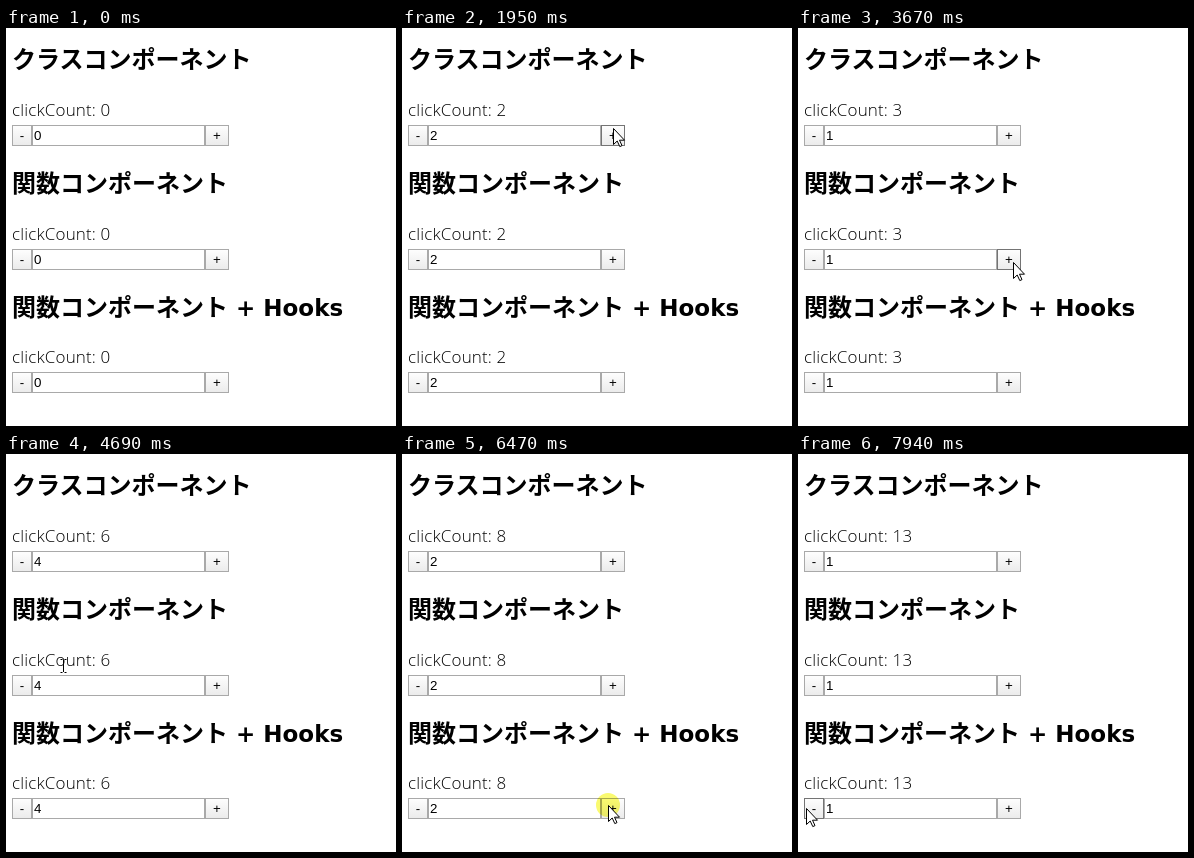
Recreate the animation shown at these times as an HTML page. Size 390x398 px, loop 8000 ms.

```html
<!DOCTYPE html>
<html lang="ja">
<meta charset="utf-8">
<title>clickCount</title>
<style>
html, body { margin: 0; width: 100%; height: 100%; overflow: hidden; background: #fff; }
svg { display: block; width: 390px; height: 398px; }
.head { font: bold 24px "Noto Sans CJK JP", "Noto Sans CJK", sans-serif; }
.latin { font: bold 23px "DejaVu Sans", sans-serif; white-space: pre; }
.count { font: 300 17px "Open Sans", sans-serif; letter-spacing: .15px; }
.ui { font: 13.33px "Liberation Sans", Arial, sans-serif; }
.mid { text-anchor: middle; }
.box { fill: #fff; stroke: #a9a9a9; }
.btn { fill: url(#face); stroke: #a9a9a9; }
.btn.hover { stroke: #747474; }
#halo { fill: #fafa70; mix-blend-mode: multiply; }
</style>
<svg viewBox="0 0 390 398">
  <linearGradient id="face" x2="0" y2="1"><stop stop-color="#fefefe"/><stop offset="1" stop-color="#ebebeb"/></linearGradient>
  <g id="rows"></g>
  <circle id="halo" r="12"/>
  <path id="arrow" d="M.5.5V16.5L4.2 13 6.8 18.6 9 17.6 6.5 12.2H11.5Z" fill="#fff" stroke="#000"/>
  <path id="beam" d="M-2.5-6.5H-.5M1.5-6.5H3.5M.5-6V6M-2.5 6.5H-.5M1.5 6.5H3.5" fill="none" stroke="#000"/>
</svg>
<script>
const LOOP = 8000, STEP = 78;
const $ = id => document.getElementById(id);
const rowY = [0, 124, 247];
const titles = ['クラスコンポーネント', '関数コンポーネント', '関数コンポーネント<tspan class="latin"> + Hooks</tspan>'];

const smooth = s => s * s * s * (10 - 15 * s + 6 * s * s);
const out = p => s => 1 - (1 - s) ** p;

// The pointer travels to each button between start and end on a bowed path,
// then clicks it `times` times, `gap` apart, holding it down for `hold`.
const visits = [
  { start: 380, end: 770, x: 212, y: 113, bow: 0, ease: smooth, add: 1, press: 1320, gap: 400, times: 2, hold: 80 },
  { start: 1950, end: 2720, x: 13, y: 112, bow: -46, ease: smooth, add: -1, press: 2810, gap: 0, times: 1, hold: 170 },
  { start: 3060, end: 3670, x: 215, y: 234, bow: 10, ease: smooth, add: 1, press: 3740, gap: 315, times: 3, hold: 80 },
  { start: 4600, end: 5150, x: 16, y: 232, bow: -29, ease: out(5.5), add: -1, press: 5300, gap: 310, times: 2, hold: 155 },
  { start: 5930, end: 6390, x: 206, y: 351, bow: 0, ease: smooth, add: 1, press: 6470, gap: 310, times: 2, hold: 150 },
  { start: 6930, end: 7470, x: 8, y: 354, bow: 16, ease: out(2.8), add: -1, press: 7560, gap: 150, times: 3, hold: 80 }
];

const clicks = visits.flatMap(v => Array.from({ length: v.times }, (_, i) => {
  const down = v.press + i * v.gap;
  return { down, up: down + v.hold, add: v.add };
}));

const button = (x, y, w, sign) =>
  `<rect class="btn" x="${x + .5}" y="${y + 97.5}" width="${w - 1}" height="20"/>
   <text class="ui mid" x="${x + w / 2}" y="${y + 112}">${sign}</text>`;

$('rows').innerHTML = rowY.map((y, i) => `
  <text class="head" x="6" y="${40 + 124 * i}">${titles[i]}</text>
  <text class="count" x="6" y="${y + 88}"></text>
  <rect class="box" x="26.5" y="${y + 97.5}" width="172" height="20"/>
  <text class="ui value" x="28" y="${y + 112}"></text>
  ${button(6, y, 20, '-')}${button(199, y, 24, '+')}`).join('');

const counts = document.querySelectorAll('.count');
const values = document.querySelectorAll('.value');
const buttons = document.querySelectorAll('.btn');
const inside = (x, y, l, t, r, b) => x >= l && x < r && y >= t && y < b;

function pointer(t) {
  const i = visits.findLastIndex(v => v.start <= t);
  if (i < 0) return null;
  const to = visits[i], from = visits[i - 1] || { x: 338, y: 109 };
  const span = to.end - to.start, n = Math.round(span / STEP);
  const s = Math.min(1, (Math.floor((t - to.start) / span * n + .01) + 1) / (n + 1));
  const e = to.ease(s);
  return [
    Math.round(from.x + (to.x - from.x) * e),
    Math.round(from.y + (to.y - from.y) * e + to.bow * Math.sin(Math.PI * s))
  ];
}

function place(el, show, x, y) {
  el.style.display = show ? '' : 'none';
  if (show) el.setAttribute('transform', `translate(${x} ${y})`);
}

function draw(t) {
  const done = clicks.filter(c => c.up <= t);
  const value = done.reduce((sum, c) => sum + c.add, 0);
  counts.forEach(el => el.textContent = 'clickCount: ' + done.length);
  values.forEach(el => el.textContent = value);

  const pos = pointer(t), [x, y] = pos || [-99, -99];
  const pressed = clicks.some(c => c.down <= t && t < c.up);
  const overText = rowY.some(r => inside(x, y, 6, r + 72, 107, r + 93) || inside(x, y, 26, r + 97, 199, r + 118));
  place($('halo'), pressed, x, y);
  place($('arrow'), pos && !overText, x, y);
  place($('beam'), pos && overText, x, y);

  buttons.forEach((el, i) => {
    const top = rowY[i >> 1] + 97, [left, right] = i % 2 ? [199, 223] : [6, 26];
    el.classList.toggle('hover', !pressed && inside(x, y, left, top, right, top + 21));
  });
}

function tick() {
  draw(performance.now() % LOOP);
  requestAnimationFrame(tick);
}
tick();
</script>
</html>
```
